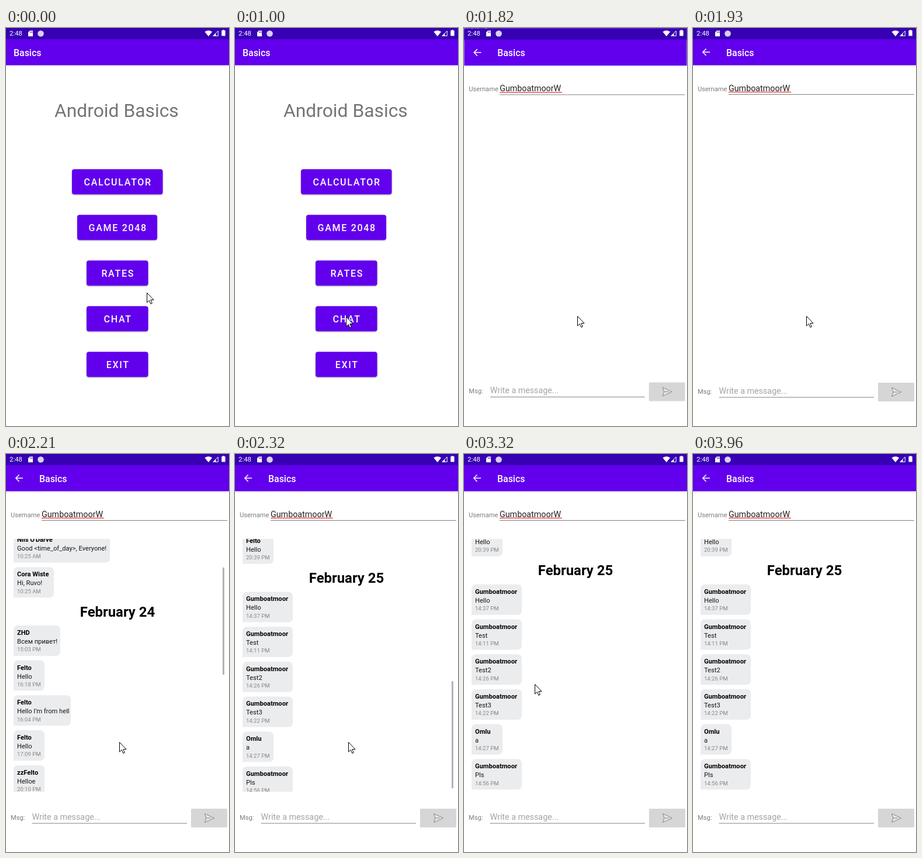
An HTML page for the animation above (5470 ms loop, 382 by 680 pixels).

```html
<!DOCTYPE html>
<html lang="en">
<head>
<meta charset="utf-8">
<title>Basics</title>
<style>
html, body { margin: 0; width: 100%; height: 100%; overflow: hidden; background: #fff; }
svg { display: block; width: 382px; height: 680px; font: 11.14px Roboto, sans-serif; }
text { white-space: pre; }
.title { font-size: 15.9px; font-weight: 500; fill: #fff; }
.headline { font-size: 31.8px; fill: #757575; }
.button rect { fill: #6200ee; filter: drop-shadow(0 1px 1px rgba(0, 0, 0, .35)); }
.button text { font-size: 16px; font-weight: 500; letter-spacing: 1.7px; fill: #fff; text-anchor: middle; }
.label { fill: #7b7b7b; }
.field { font-size: 14.3px; fill: #212121; }
.hint { font-size: 14.3px; fill: #a4a4a4; }
.day { font-size: 23.9px; font-weight: 700; text-anchor: middle; }
.name { font-weight: 700; }
.body { fill: #151515; }
.time { font-size: 9.55px; fill: #888; }
</style>
</head>
<body>
<svg viewBox="0 0 382 680">
  <defs>
    <clipPath id="viewport"><rect y="145" width="382" height="432"/></clipPath>
    <clipPath id="chatButton"><rect x="138" y="475.5" width="105.5" height="43" rx="4"/></clipPath>
    <g id="bars">
      <rect width="382" height="680" fill="#fff"/>
      <rect width="382" height="63.7" fill="#6200ee"/>
      <rect width="382" height="19.1" fill="#3700b3"/>
    </g>
  </defs>

  <g id="home">
    <use href="#bars"/>
    <text class="title" x="13" y="47.8">Basics</text>
    <text class="headline" x="83" y="152.3">Android Basics</text>
    <g id="buttons"></g>
    <circle id="ripple" cx="192" cy="493" fill="#fff" clip-path="url(#chatButton)"/>
  </g>

  <g id="chat">
    <use href="#bars"/>
    <path d="M29 41.2H17.5M22.5 35.5L16.8 41.2L22.5 47" fill="none" stroke="#fff" stroke-width="1.5"/>
    <text class="title" x="57" y="47.8">Basics</text>
    <text class="label" x="8" y="107.5">Username</text>
    <text class="field" x="61" y="108">GumboatmoorW</text>
    <path d="M61 109.5H168" stroke="#ee4b4b" stroke-width="1.5"/>
    <path d="M61 113.5H379M44.5 631H310" stroke="#828282"/>
    <g id="list" clip-path="url(#viewport)">
      <g id="messages"></g>
      <rect id="thumb" x="371" width="3" height="183" fill="#b3b3b3"/>
    </g>
    <text class="label" x="8" y="625">Msg:</text>
    <text class="hint" x="44.5" y="625">Write a message...</text>
    <rect x="317" y="606" width="62" height="32" rx="1.5" fill="#d6d6d6"/>
    <path d="M340.5 614.5L356.5 622L340.5 629.5L343 622ZM343 622H351" fill="#e6e6e6" stroke="#858585" stroke-linejoin="round"/>
  </g>

  <g fill="#fff">
    <text x="6" y="13.3" font-size="11.4">2:48</text>
    <path d="M40.8 4.5H46V14.3H38V7.3Z"/>
    <path d="M41.3 6V8.3M43 6V8.3M44.7 6V8.3" stroke="#3700b3" stroke-width=".8"/>
    <circle cx="59.5" cy="9.5" r="5.3" fill="#d9cff0"/>
    <path d="M346.8 14.2L340.5 6.6Q346.8 2 353.1 6.6Z"/>
    <path d="M363.3 5V13.5H354.8Z" fill="none" stroke="#fff"/>
    <path d="M359.5 9V13.5H355Z"/>
    <path d="M369.3 4.3H371V3.2H374V4.3H375.7V13.6H369.3Z"/>
  </g>
  <path id="cursor" d="M.5.5V17L4.3 13.4L6.8 19.3L9.3 18.3L6.9 12.5H12Z" fill="#fff" stroke="#000"/>
</svg>

<script>
const LOOP = 5470, STEP = 1000 / 28;
const ITEM = 59.7, HEADER = 40, VIEW_TOP = 145, VIEW = 432;
const $ = id => document.getElementById(id);
const progress = (t, from, to) => Math.max(0, Math.min(1, (t - from) / (to - from)));

const buttons = [["CALCULATOR", 113, 155.5], ["GAME 2048", 122, 137], ["RATES", 138, 105.5], ["CHAT", 138, 105.5], ["EXIT", 138, 105.5]];
$("buttons").innerHTML = buttons.map(([label, x, w], i) => `<g class="button" transform="translate(0 ${241.3 + 78 * i})">
  <rect x="${x}" width="${w}" height="43" rx="4"/><text x="191.7" y="27.7">${label}</text></g>`).join("");

// A lone string is a day header; otherwise name, text, time and bubble width.
const entries = [
  "February 23",
  ["Nils O'Darve", "Hello", "10:24 AM", 78],
  ["Nils O'Darve", "Good &lt;time_of_day&gt;, Everyone!", "10:25 AM", 165],
  ["Cora Wiste", "Hi, Ruvo!", "10:25 AM", 69],
  "February 24",
  ["ZHD", "Всем привет!", "15:03 PM", 80],
  ["Felto", "Hello", "16:18 PM"],
  ["Felto", "Hello I'm from hell", "16:04 PM", 98],
  ["Felto", "Hello", "17:09 PM"],
  ["zzFelto", "Helloe", "20:10 PM"],
  ["Felto", "Hello", "20:39 PM"],
  "February 25",
  ["Gumboatmoor", "Hello", "14:37 PM", 86],
  ["Gumboatmoor", "Test", "14:11 PM", 86],
  ["Gumboatmoor", "Test2", "14:26 PM", 86],
  ["Gumboatmoor", "Test3", "14:22 PM", 86],
  ["Omlu", "a", "14:27 PM"],
  ["Gumboatmoor", "Pls", "14:56 PM", 86],
];

let contentHeight = 0;
$("messages").innerHTML = entries.map(entry => {
  const y = contentHeight, isDay = typeof entry === "string";
  contentHeight += isDay ? HEADER : ITEM;
  if (isDay) return `<text class="day" x="191" y="${y + 28.6}">${entry}</text>`;
  const [name, body, time, w = 53] = entry;
  return `<g transform="translate(13 ${y + 4})">
    <path d="M0 52V8Q0 0 8 0H${w - 8}q8 0 8 8V44q0 8 -8 8Z" fill="#ebecee"/>
    <text class="name" x="6" y="16">${name}</text>
    <text class="body" x="6" y="31">${body}</text>
    <text class="time" x="6" y="44.4">${time}</text></g>`;
}).join("");
const maxScroll = contentHeight - VIEW;

// Pointer path: time, x, y
const path = [
  [0, 241, 452], [214, 189, 493], [965, 189, 493], [1000, 190, 493], [1035, 192, 493],
  [1700, 192, 493], [1740, 194, 492], [2755, 194, 492], [2785, 194, 495],
  [2900, 165, 400], [2990, 135, 360], [3107, 119, 390], [3220, 119, 390], [3320, 121, 393],
  [3540, 121, 393], [3680, 123, 440], [3964, 73, 685],
];

function pointerAt(t) {
  const i = path.findIndex(key => key[0] > t);
  if (i < 0) return path.at(-1).slice(1);
  const a = path[i - 1], b = path[i], k = progress(t, a[0], b[0]);
  return [1, 2].map(n => Math.round(a[n] + (b[n] - a[n]) * k));
}

// Fast start with a long settling tail, as in a platform scroller.
function viscous(u) {
  const curve = x => x < 1 ? x - 1 + Math.exp(-x) : 1 - Math.exp(1 - x) * (1 - 1 / Math.E);
  return curve(8 * u) / curve(8);
}
const settle = u => 1.007 * u ** 3 / (u ** 3 + .007);

function zoom(el, s) {
  if (s === 1) el.removeAttribute("transform");
  else el.setAttribute("transform", `translate(191 340) scale(${s}) translate(-191 -340)`);
}

function draw(t) {
  const [x, y] = pointerAt(t);
  $("cursor").setAttribute("transform", `translate(${x} ${y})`);

  $("ripple").setAttribute("r", 5 + 65 * progress(t, 1240, 1340));
  $("ripple").setAttribute("opacity", t < 1249 ? 0 : .24 * (1 - progress(t, 1310, 1390)));

  const opened = t > 1925;
  const open = settle(progress(t, 1590, 1925));
  const alpha = progress(t, 1590, 1680);
  zoom($("home"), 1 + .15 * open);
  zoom($("chat"), opened ? 1 : .85 + .15 * open);
  $("home").style.display = opened ? "none" : "";
  $("chat").style.display = alpha ? "" : "none";
  $("chat").setAttribute("opacity", alpha);

  const scroll = maxScroll * viscous(progress(t, 2193.7, 2428.5));
  $("list").style.display = t < 2140 ? "none" : "";
  $("messages").setAttribute("transform", `translate(0 ${VIEW_TOP - scroll})`);
  $("thumb").setAttribute("y", VIEW_TOP + scroll / maxScroll * (VIEW - 183.5));
  $("thumb").setAttribute("opacity", 1 - progress(t, 2775, 3025));
}

const hold = t => Math.floor((t + 5) / STEP) * STEP;

const start = performance.now();
function tick() {
  draw(hold((performance.now() - start) % LOOP));
  requestAnimationFrame(tick);
}
tick();
</script>
</body>
</html>
```
